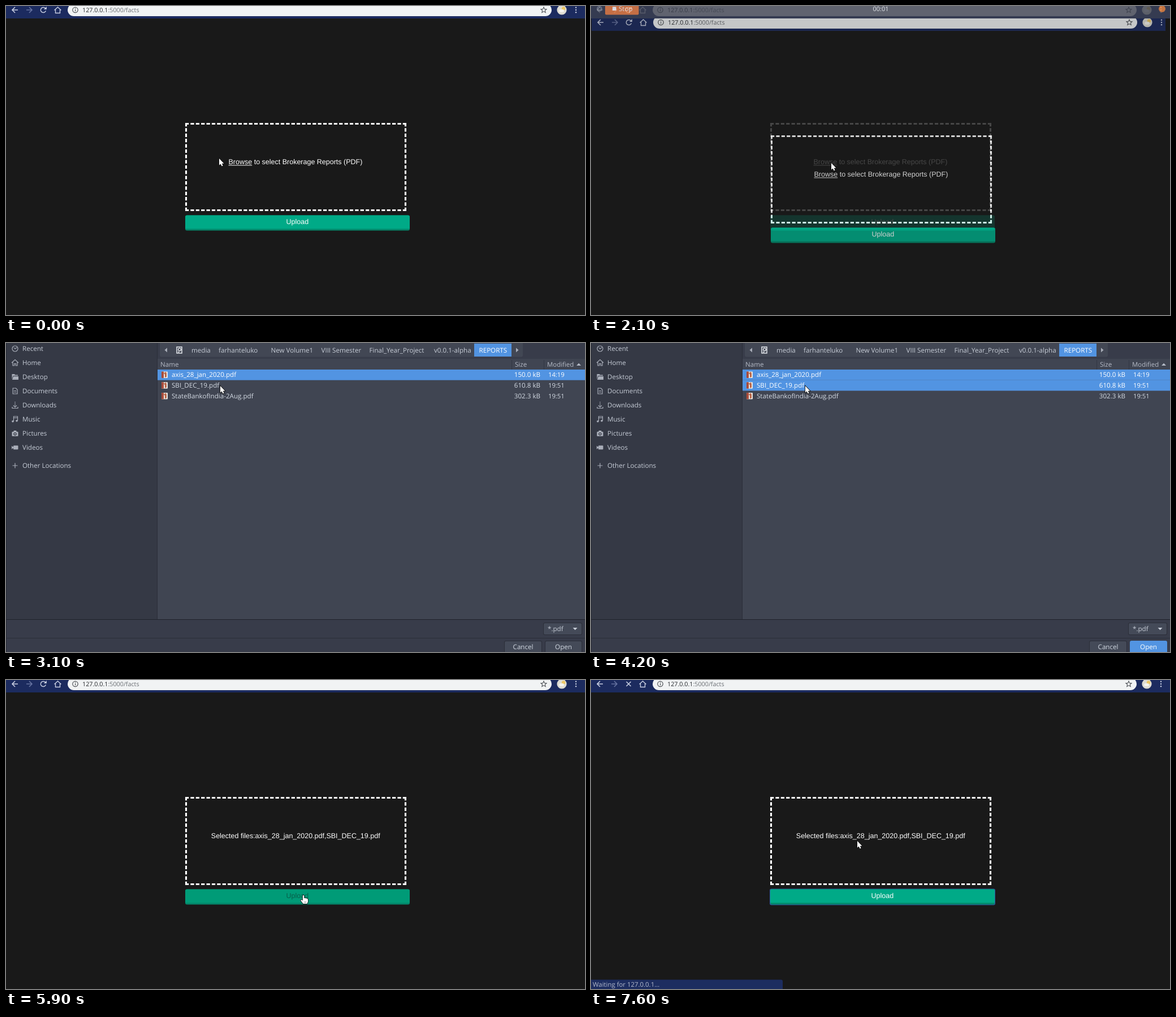
These frames come from a looping animation (1024x547 px, 8 s). An HTML page with a canvas:

```html
<!DOCTYPE html>
<html lang="en">
<head>
<meta charset="utf-8">
<title>Report upload</title>
<style>
html, body { margin: 0; width: 1024px; height: 547px; overflow: hidden; background: #191919; }
canvas { display: block; }
</style>
</head>
<body>
<canvas id="stage" width="1024" height="547"></canvas>
<script>
const W = 1024, H = 547, LOOP = 8000;
const UI = '"Open Sans", "Noto Sans", sans-serif';
const PAGE = '12.5px "Liberation Sans", Arial, sans-serif';
const BAR = '10.75px ' + UI, DIALOG = '11.6px ' + UI;
const screen = document.getElementById('stage').getContext('2d');
const layer = document.createElement('canvas');
layer.width = W;
layer.height = H;
const layerCtx = layer.getContext('2d');
screen.textRendering = layerCtx.textRendering = 'geometricPrecision';
let c = screen;

// [time, x, y] of the pointer tip; each place holds until the next one
const pointer = [
  [0, 377, 270], [200, 372, 280], [300, 369, 293], [400, 374, 305], [500, 396, 300],
  [600, 422, 276], [700, 446, 250], [800, 465, 236], [900, 477, 244], [1000, 480, 262],
  [1100, 477, 284], [1200, 467, 295], [1300, 453, 288], [1400, 441, 270], [1500, 432, 256],
  [1600, 426, 266], [1700, 425, 278], [3000, 398, 150], [3100, 379, 76],
  [4600, 418, 126], [4700, 462, 184], [5000, 503, 313], [5200, 494, 405],
  [5500, 525, 395], [5800, 526, 381], [7300, 612, 289], [7600, 471, 285]
];

function rect(x, y, w, h, fill, r = 0) {
  c.fillStyle = fill;
  c.beginPath();
  c.roundRect(x, y, w, h, r);
  c.fill();
}

function disc(x, y, r, fill) {
  c.fillStyle = fill;
  c.beginPath();
  c.arc(x, y, r, 0, 2 * Math.PI);
  c.fill();
}

function ring(x, y, r, color, width = 1.2, from = 0, to = 2 * Math.PI) {
  c.strokeStyle = color;
  c.lineWidth = width;
  c.beginPath();
  c.arc(x, y, r, from, to);
  c.stroke();
}

function text(s, x, y, color, font = DIALOG, align = 'left') {
  c.font = font;
  c.fillStyle = color;
  c.textAlign = align;
  c.fillText(s, x, y);
}

function line(d, color, width = 1.2, x = 0, y = 0) {
  c.save();
  c.translate(x, y);
  c.strokeStyle = color;
  c.lineWidth = width;
  c.stroke(new Path2D(d));
  c.restore();
}

function shape(d, fill, x = 0, y = 0) {
  c.save();
  c.translate(x, y);
  c.fillStyle = fill;
  c.fill(new Path2D(d));
  c.restore();
}

function browserBar(loading) {
  const ink = '#c9cfe2';
  rect(0, 0, W, 22, '#1c2b5f');
  line('M5 0H-5M0 -5L-5 0L0 5', ink, 1.6, 16, 7);
  line('M-5 0H5M0 -5L5 0L0 5', '#6673a0', 1.6, 41, 7);
  if (loading) {
    line('M-4 -4L4 4M4 -4L-4 4', ink, 1.6, 66.5, 7);
  } else {
    ring(66, 7, 4.6, ink, 1.5, 0.3, 5.5);
    shape('M1 -1H5.8V-6Z', ink, 66, 7);
  }
  line('M-6 0L0 -5.5L6 0M-4 -1V5H4V-1', ink, 1.4, 91.5, 7.5);
  rect(109, -4, 856, 22, '#f1f3f4', 11);
  ring(122.5, 7, 4.7, '#4c5054');
  rect(122, 6.3, 1.2, 3.3, '#4c5054');
  rect(122, 4, 1.2, 1.3, '#4c5054');
  text('127.0.0.1', 135, 11, '#25282c', BAR);
  const host = c.measureText('127.0.0.1').width;
  text(':5000/facts', 135 + host, 11, '#696d72', BAR);
  line('M0 -5L1.5 -1.6L5 -1.4L2.3 1L3.2 4.5L0 2.6L-3.2 4.5L-2.3 1L-5 -1.4L-1.5 -1.6Z', '#54585d', 1.1, 951, 7);
  disc(983, 7, 8.6, '#dedcd3');
  disc(986, 4.5, 3.2, '#ecc766');
  rect(978, 6, 9, 5, '#f5f4ef', 2.5);
  for (const y of [2.8, 7, 11.2]) disc(1008, y, 1.2, ink);
}

function dashedSide(x1, y1, x2, y2) {
  const size = 3.1, dash = 2 * size;
  const len = Math.hypot(x2 - x1, y2 - y1);
  const n = Math.round((len + size) / (dash + size));
  c.setLineDash([dash, (len - n * dash) / (n - 1)]);
  c.lineWidth = size;
  c.strokeStyle = '#fff';
  c.beginPath();
  c.moveTo(x1, y1);
  c.lineTo(x2, y2);
  c.stroke();
  c.setLineDash([]);
}

function mix(a, b, k) {
  return 'rgb(' + a.map((v, i) => Math.round(v + (b[i] - v) * k)) + ')';
}

function page({ selected = false, hover = 0, loading = false, status = false } = {}) {
  rect(0, 0, W, H, '#191919');
  browserBar(loading);
  dashedSide(317, 208.5, 708, 208.5);
  dashedSide(317, 361.5, 708, 361.5);
  dashedSide(318.5, 207, 318.5, 363);
  dashedSide(706.5, 207, 706.5, 363);
  if (selected) {
    text('Selected files:axis_28_jan_2020.pdf,SBI_DEC_19.pdf', 512.2, 280.3, '#fff', PAGE, 'center');
  } else {
    text('Browse to select Brokerage Reports (PDF)', 393.5, 280.3, '#fff', PAGE);
    rect(393.5, 281.6, c.measureText('Browse').width, 1, '#fff');
  }
  if (loading) rect(316, 369.5, 399, 29, '#2d59a0', 3);
  rect(317, 370.5, 397, 27, '#03876a', 3);
  rect(317, 370.5, 397, 24, mix([0, 170, 135], [0, 155, 119], hover), [3, 3, 1, 1]);
  text('Upload', 515.3, 386, mix([255, 255, 255], [8, 94, 74], hover), PAGE, 'center');
  if (status) {
    rect(0, 530.5, 339, 17, '#1d2d60', [0, 3, 0, 0]);
    text('Waiting for 127.0.0.1…', 3, 543, '#b3bacb', '11.4px ' + UI);
  }
}

// The page one window title bar lower, blended over its old place
function shiftedPage() {
  page();
  c = layerCtx;
  c.save();
  rect(0, 0, W, H, '#191919');
  c.translate(1, 22);
  page();
  c.restore();
  rect(1016, 22, 8, 22, '#191919');
  rect(0, 0, W, 22, '#3c404e');
  disc(15, 5, 5, '#777c88');
  line('M-2 -2L2 2M2 -2L-2 2', '#3c404e', 1.2, 15, 5);
  rect(25, -4, 59.5, 19.5, '#f0803f', 2);
  rect(38, 1.5, 6.5, 6.5, '#fff');
  text('Stop', 49, 9, '#fff');
  text('00:01', 512.5, 9, '#dfe2e8', '11px ' + UI, 'center');
  disc(1010, 5, 6, '#f0883c');
  c = screen;
  c.globalAlpha = 0.8;
  c.drawImage(layer, 0, 0);
  c.globalAlpha = 1;
}

const places = ['Recent', 'Home', 'Desktop', 'Documents', 'Downloads', 'Music', 'Pictures', 'Videos', 'Other Locations'];

function placeIcon(i, y) {
  const ink = '#a9aeb9', x = 16;
  switch (i) {
    case 0: ring(x, y, 5, ink); line('M-2 -2L0 .5L3 -2', ink, 1.1, x, y); break;
    case 1: line('M-6 0L0 -5.5L6 0M-4 -1V5H-1.3V1.5H1.3V5H4V-1', ink, 1.2, x, y); break;
    case 2: shape('M-5.5 -5H-1L0 -3.5H5V-2H-3.5L-5.5 4ZM-3 -1H6V5H-5Z', ink, x, y); break;
    case 3: line('M-3.8 -5H1.5L4 -2.5V5H-3.8ZM-2 -.5H2M-2 2H2', ink, 1.2, x, y); break;
    case 4:
      c.setLineDash([1.6, 1.2]);
      line('M0 -6V3', ink, 1.3, x, y);
      c.setLineDash([]);
      line('M-3 .5L0 3.5L3 .5M-5 3V5.5H5V3', ink, 1.2, x, y);
      break;
    case 5: line('M-2.5 3.5V-5H4.5V2.5M-2.5 -2.5H4.5', ink, 1.2, x, y); disc(x - 4, y + 3.7, 1.8, ink); disc(x + 3, y + 2.7, 1.8, ink); break;
    case 6: rect(x - 5.5, y - 3, 11, 8, ink, 1); rect(x - 2.5, y - 5, 5, 3, ink, 1); disc(x, y + 1, 2.7, '#353945'); disc(x, y + 1, 1.4, ink); break;
    case 7: rect(x - 3, y - 3.5, 8.5, 7, ink, 1); shape('M-6 -3L-2 0L-6 3Z', ink, x, y); break;
    default: line('M-4.5 0H4.5M0 -4.5V4.5', ink, 1.2, x, y);
  }
}

function button(label, x, w, active) {
  rect(x, 527, w, 24, active ? '#5294e2' : '#2b2e39', 3);
  if (!active) rect(x + 1, 528, w - 2, 24, '#444a58', 2);
  text(label, x + w / 2, 542, active ? '#fff' : '#d3dae3', DIALOG, 'center');
}

function fileRow(i, name, size, time, chosen) {
  const y = 47 + i * 18.7, ink = chosen ? '#fff' : '#d3dae3';
  if (chosen) rect(268, y, 756, 18.8, '#5294e2');
  rect(275, y + 3.5, 11, 11.5, '#ece7e2', 1);
  rect(275, y + 3.5, 4, 11.5, '#a84c3b', 1);
  shape('M4 3L8 1L9 4V10L6 11V6Z', '#b8674a', 275, y + 3);
  text(name, 293, y + 13.2, ink);
  text(size, 945, y + 13.2, ink, DIALOG, 'right');
  text(time, 959, y + 13.2, ink, '11.2px ' + UI);
}

function dialog(both, ready) {
  const ink = '#c6ccd6', edge = '#2b2e39';
  rect(0, 0, W, H, '#383c4a');
  rect(0, 0, 267, 489, '#353945');
  places.forEach((name, i) => {
    const y = i < 8 ? 10 + 25 * i : 217;
    placeIcon(i, y);
    text(name, 29, y + 4.2, ink);
  });
  rect(267, 0, 1, 489, edge);
  rect(268, 28, 756, 461, '#404552');

  rect(272, -4, 642, 28.5, '#424754', 3);
  shape('M2 -4V4L-2.5 0Z', '#a9aeb9', 283, 12.5);
  line('M-4.5 -5.5H4.5V5.5H-4.5ZM-2.5 3.5H0', '#e4e7ec', 1.5, 306.5, 12.5);
  ring(307, 11.5, 2.4, '#e4e7ec', 1.4);
  rect(828, 1, 66, 23, '#5294e2');
  const crumbs = [['media', 328], ['farhanteluko', 376], ['New Volume1', 468.5], ['VIII Semester', 557.5],
    ['Final_Year_Project', 642.5], ['v0.0.1-alpha', 757]];
  for (const [name, x] of crumbs) text(name, x, 16.7, ink);
  text('REPORTS', 861.3, 16.7, '#fff', DIALOG, 'center');
  shape('M-2 -4V4L2.5 0Z', '#a9aeb9', 904, 12.5);

  text('Name', 273, 42.2, '#b6bcc8');
  text('Size', 900, 42.2, '#b6bcc8');
  text('Modified', 957, 42.2, '#b6bcc8', '11.4px ' + UI);
  shape('M-4 2L0 -2.3L4 2Z', '#b6bcc8', 1013, 38);
  rect(894, 30, 1, 17, '#323643');
  rect(951, 30, 1, 17, '#323643');
  fileRow(0, 'axis_28_jan_2020.pdf', '150.0 kB', '14:19', true);
  fileRow(1, 'SBI_DEC_19.pdf', '610.8 kB', '19:51', both);
  fileRow(2, 'StateBankofIndia-2Aug.pdf', '302.3 kB', '19:51', false);

  rect(0, 489, W, 1, '#1f222b');
  rect(0, 522, W, 1, edge);
  rect(950, 495, 69, 22, edge, 3);
  rect(951, 496, 67, 20, '#444a58', 2);
  text('*.pdf', 958, 510.2, ink);
  shape('M-4 -2H4L0 2.3Z', ink, 1006.5, 506);
  button('Cancel', 881, 67, false);
  button('Open', 953, 66, ready);
  rect(0, 0, 1, H, '#252833');
}

function drawPointer(x, y, hand) {
  const d = hand
    ? 'M-1.2 .8Q0 -.8 1.2 .8V5L5.5 5.6Q8 6 8 8V11.5L6.5 15H-.5L-4.6 9.5Q-4.6 7.6 -3 8.2L-1.2 9.6Z'
    : 'M0 0V11.8L2.7 9.4L4.5 13.6L6.6 12.7L4.8 8.7H8.4Z';
  line(d, '#111', 1.6, x, y);
  shape(d, '#fff', x, y);
  if (hand) line('M2.2 11V13.5M4.2 11V13.5', '#555', 0.7, x, y);
}

function draw(t) {
  if (t >= 2100 && t < 2200) shiftedPage();
  else if (t >= 2200 && t < 4400) dialog(t >= 3700, t >= 4200);
  else page({
    selected: t >= 4400,
    hover: t < 5800 || t >= 7100 ? 0 : t < 5900 ? 0.5 : 1,
    loading: t >= 7100,
    status: t >= 7300
  });
  const [, x, y] = pointer.findLast(p => p[0] <= t);
  drawPointer(x, y, t >= 5800 && t < 7300);
}

const start = performance.now();
function frame() {
  draw((performance.now() - start) % LOOP);
  requestAnimationFrame(frame);
}
frame();
</script>
</body>
</html>
```
